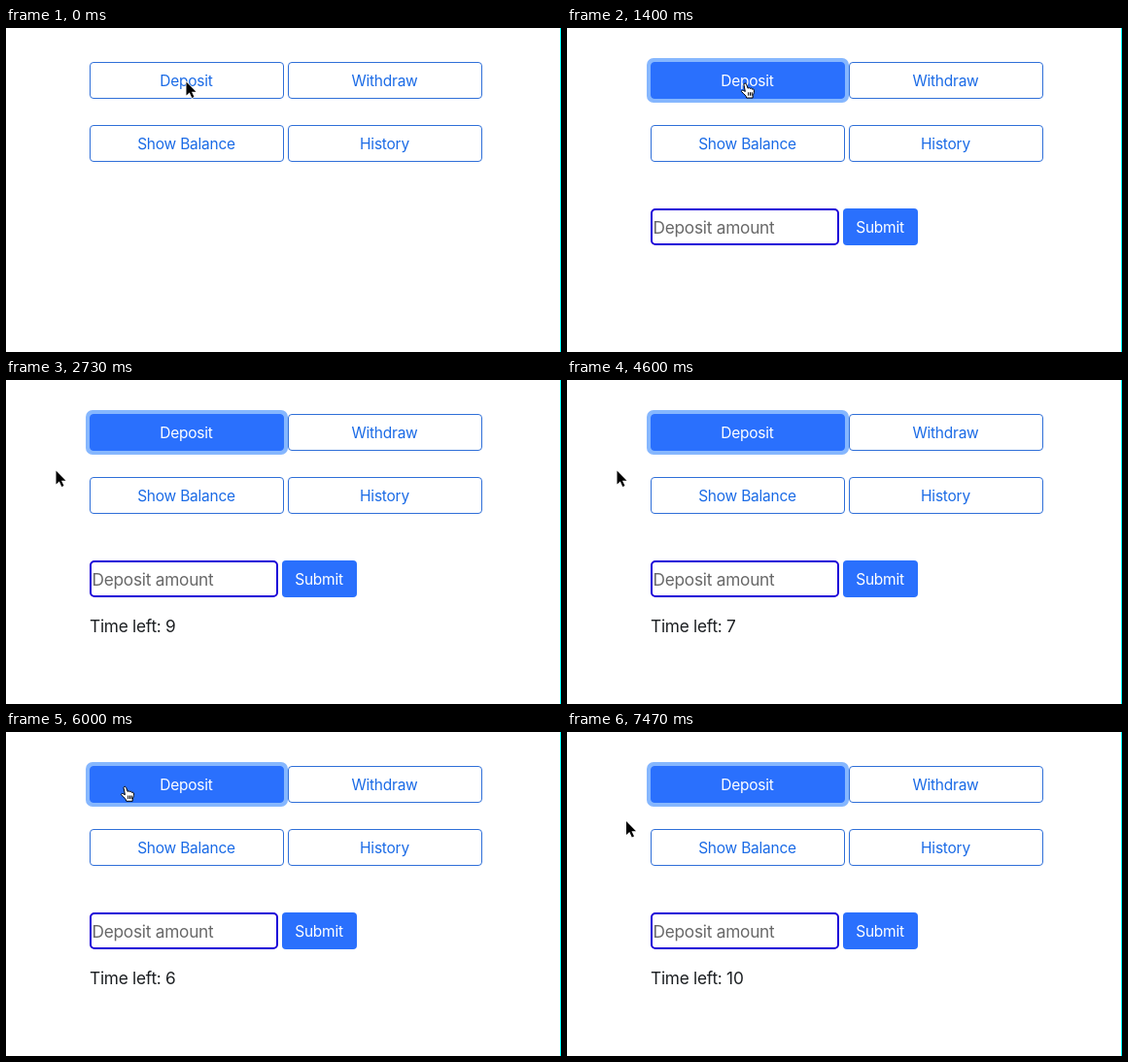
These frames come from a looping animation (571x334 px, 8000 ms). An HTML page:

```html
<!DOCTYPE html>
<html lang="en">
<head>
<meta charset="utf-8">
<title>Deposit form</title>
<style>
  html, body { margin: 0; width: 100%; height: 100%; overflow: hidden; background: #fff; }
  svg { display: block; width: 571px; height: 334px; }
  text { font-family: Inter, Roboto, sans-serif; letter-spacing: -.015em; }
  .label { font-size: 15.5px; text-anchor: middle; fill: #1b6be6; }
  .large { font-size: 17.3px; fill: #1c1f22; }
  .outline { fill: #fff; stroke: #2f6fd8; }
</style>
</head>
<body>
<svg viewBox="0 0 571 334">
  <rect x="570" width="1" height="334" fill="#0ff"/>
  <g id="buttons"></g>
  <g id="form">
    <rect x="87" y="187" width="192" height="36" rx="4" fill="#fff" stroke="#1c00d8" stroke-width="2"/>
    <text class="large" x="88.5" y="212" style="fill:#686868">Deposit amount</text>
    <rect x="284" y="186" width="77" height="38" rx="4" fill="#2a70fd"/>
    <text class="label" x="322" y="211" style="fill:#fff">Submit</text>
  </g>
  <text class="large" id="timer" x="86" y="260"></text>
  <g id="cursor" stroke-linejoin="round">
    <path id="arrow" d="M0 0V14L3.3 11L5.8 16.6L8 15.6L5.5 10.2H10Z" stroke="#fff" stroke-width="1.4" paint-order="stroke"/>
    <path id="hand" transform="translate(-4 0)" fill="#fff" stroke="#000" d="M3 1.8C3.5.4 5 .4 5.6 1.8L7.2 6C8 5 9 5 9.3 6.2C10.2 5.3 11.2 5.7 11.4 6.9C12.6 6.2 13.6 7 13.5 8.6C13.5 11 12.8 12 12.2 13.5V15.8H5.8C5.5 13.5 3.6 12.3.8 9.6C0 8.6 1.2 7.4 2.6 8.2L4.4 9.2ZM7.7 10V13.5M9.6 10V13.5M11.3 10V13.5"/>
  </g>
</svg>
<script>
const $ = id => document.getElementById(id);
const FPS = 15, LOOP = 8000;
const HOVER = 7, CLICK = 9, COUNT = 24, RECLICK = 97, RECOUNT = 112;
const BLUE = [42, 112, 253], WHITE = [255, 255, 255];

// Pointer moves: start tick, end tick, destination.
const moves = [
  [20, 26, 47, 96],
  [28, 30, 48, 97],
  [38, 41, 51.5, 93.5],
  [83, 90, 122, 55.5],
  [104, 112, 61, 92]
];

const clamp = v => Math.max(0, Math.min(1, v));
const ease = u => u < .5 ? 4 * u ** 3 : 1 - 4 * (1 - u) ** 3;
const mix = (a, b, p) => `rgb(${a.map((v, i) => Math.round(v + (b[i] - v) * p))})`;
const show = (el, on) => el.setAttribute("visibility", on ? "visible" : "hidden");

const button = (x, y, label) => `<g>
  <rect class="outline" x="${x + .5}" y="${y + .5}" width="199" height="37" rx="3.5"/>
  <text class="label" x="${x + 99.5}" y="${y + 25}">${label}</text></g>`;

$("buttons").innerHTML =
  button(290, 35, "Withdraw") + button(86, 100, "Show Balance") + button(290, 100, "History") +
  '<rect id="glow" x="82" y="31" width="208" height="46" rx="7" fill="#86b7fe"/>' +
  button(86, 35, "Deposit");
const [face, caption] = $("buttons").lastElementChild.children;

function pointer(tick) {
  let x = 185.5, y = 55.5;
  for (const [from, to, toX, toY] of moves) {
    const p = ease(clamp((tick - from) / (to - from)));
    x += (toX - x) * p;
    y += (toY - y) * p;
  }
  return [x, y];
}

function timer(tick) {
  if (tick < COUNT || tick >= RECLICK && tick < RECOUNT) return "";
  const start = tick < RECLICK ? COUNT : RECOUNT;
  return "Time left: " + (10 - Math.floor((tick - start) / FPS));
}

function draw(ms) {
  const tick = Math.floor((ms % LOOP + 4) * FPS / 1000) % (LOOP * FPS / 1000);

  const fill = 1 - (1 - clamp((tick - HOVER) / 2.5)) ** 2;
  face.style.fill = mix(WHITE, BLUE, fill);
  face.style.stroke = fill ? "#2a70fd" : "";
  caption.style.fill = mix([27, 107, 230], WHITE, fill);

  $("glow").setAttribute("opacity", clamp((tick - CLICK + 1) / 2));
  show($("glow"), tick >= CLICK);
  show($("form"), tick >= CLICK);
  $("timer").textContent = timer(tick);

  const [x, y] = pointer(tick);
  const over = tick >= HOVER && x > 86 && y < 73;
  $("cursor").setAttribute("transform", `translate(${x} ${y})`);
  show($("hand"), over);
  show($("arrow"), !over);
}

const start = performance.now();
function loop() {
  draw(performance.now() - start);
  requestAnimationFrame(loop);
}
loop();
</script>
</body>
</html>
```
